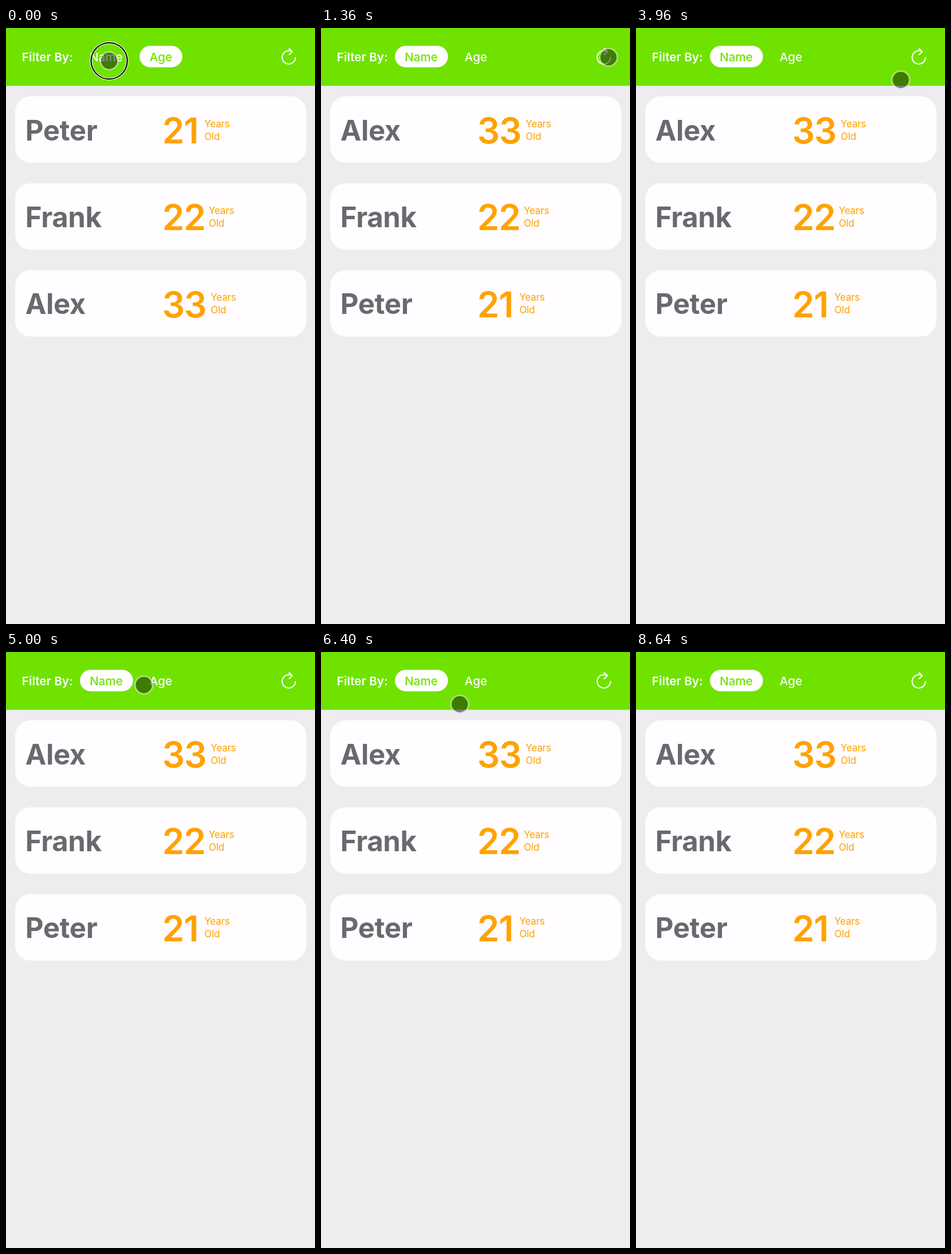
Recreate the animation shown at these times as an HTML page. Size 539 px wide and 1038 px high, loop 8680 ms.

```html
<!DOCTYPE html>
<html lang="en">
<head>
<meta charset="utf-8">
<style>
  html, body { margin: 0; width: 100%; height: 100%; overflow: hidden; background: #eeecef; }
  svg { display: block; width: 100%; height: 100%; }
  text { font-family: Inter, Roboto, sans-serif; font-optical-sizing: none; }
  .bar { font-size: 20.6px; fill: #fff; }
  .tab { font-weight: 500; }
  .name { font-size: 49px; font-weight: 700; letter-spacing: -.3px; fill: #6b696d; }
  .age { font-size: 62px; font-weight: 600; letter-spacing: -1.1px; fill: #ffa200; }
  .unit { font-size: 17px; letter-spacing: -.2px; fill: #ffa200; }
  .line { fill: none; stroke: #fff; stroke-width: 2; stroke-linecap: round; stroke-linejoin: round; }
</style>
</head>
<body>
<svg viewBox="0 0 539 1038">
  <rect width="539" height="1038" fill="#eeecef"/>
  <rect width="539" height="100.6" fill="#70e200"/>
  <text class="bar" x="27.7" y="57.8" font-weight="600" letter-spacing=".1">Filter By:</text>
  <rect id="pill" y="31" height="37.5" rx="18.7" fill="#fff"/>
  <text class="bar tab" id="nameTab" x="146" y="57.8">Name</text>
  <text class="bar tab" id="ageTab" x="250.5" y="57.8">Age</text>
  <g id="refresh" class="line">
    <path d="M504.9 51.4A11.6 11.6 0 1 1 498.7 40.9"/>
    <path d="M493.9 35.9L499.5 41.1L493.9 46.4"/>
  </g>
  <text class="bar" id="loading" x="417" y="57.8" font-weight="300">Loading...</text>
  <g id="cards"></g>
  <g id="pointer">
    <g id="ring" fill="none">
      <circle stroke="#fff" stroke-opacity=".9" stroke-width="4.2"/>
      <circle stroke="#000" stroke-width="2.1"/>
    </g>
    <circle r="14.2" fill="#000" fill-opacity=".45"/>
    <circle r="15.6" fill="none" stroke="#e0e0e0" stroke-opacity=".5" stroke-width="2.8"/>
  </g>
</svg>
<script>
const LOOP = 8680;
const $ = id => document.getElementById(id);
const show = (el, on) => el.setAttribute('visibility', on ? 'visible' : 'hidden');
const within = (t, from, to) => t >= from && t < to;

const people = [
  { name: 'Alex', age: 33, unitX: 357 },
  { name: 'Frank', age: 22, unitX: 353.7 },
  { name: 'Peter', age: 21, unitX: 346 }
];
const pitch = 151.4;

// Pointer stops: time, x, y
const stops = [
  [0, 180, 57.3], [160, 180, 57.3], [720, 509, 53], [1000, 501.5, 51], [1640, 501.5, 51],
  [2040, 461.8, 77], [2600, 461.8, 77], [2960, 461.8, 90.5], [4440, 461.8, 90.5],
  [5000, 240.5, 57.5], [5080, 246, 57], [5320, 246, 57], [5680, 180, 57],
  [5920, 180, 57], [6200, 242, 91], [6440, 242, 91], [6960, 570, 91], [LOOP, 570, 91]
];
const clicks = [-200, 1400, 5060, 5690];
const clickTime = 240;

const cards = people.map(({ name, age, unitX }) => {
  const card = document.createElementNS('http://www.w3.org/2000/svg', 'g');
  card.innerHTML = `
    <rect x="16" y="119" width="508" height="115.7" rx="27" fill="#fffdff"/>
    <text class="name" x="33.7" y="195.6">${name}</text>
    <text class="age" x="272.4" y="200.8">${age}</text>
    <text class="unit" x="${unitX}" y="172.5">Years</text>
    <text class="unit" x="${unitX}" y="194.6">Old</text>`;
  $('cards').append(card);
  return card;
});

function pointerAt(t) {
  const i = stops.findIndex(stop => stop[0] > t);
  const [t0, x0, y0] = stops[i - 1], [t1, x1, y1] = stops[i];
  const p = (t - t0) / (t1 - t0), ease = p * p * (3 - 2 * p);
  return [x0 + (x1 - x0) * ease, y0 + (y1 - y0) * ease];
}

function draw(now) {
  const t = now % LOOP;
  const byAge = t < 80 || within(t, 5320, 5920);
  const loading = within(t, 1600, 3600);

  $('pill').setAttribute('x', byAge ? 233 : 129);
  $('pill').setAttribute('width', byAge ? 74.5 : 92.5);
  $('nameTab').style.fill = byAge ? '#fff' : '#70e200';
  $('ageTab').style.fill = byAge ? '#70e200' : '#fff';
  show($('refresh'), !loading);
  show($('loading'), loading);
  cards.forEach((card, i) =>
    card.setAttribute('transform', `translate(0 ${pitch * (byAge ? 2 - i : i)})`));

  $('pointer').setAttribute('transform', `translate(${pointerAt(t)})`);
  const click = clicks.find(start => within(t, start, start + clickTime));
  show($('ring'), click !== undefined);
  if (click !== undefined) {
    const radius = 16 + 18.6 * (t - click) / clickTime;
    for (const circle of $('ring').children) circle.setAttribute('r', radius);
  }
  requestAnimationFrame(draw);
}
draw(0);
</script>
</body>
</html>
```
